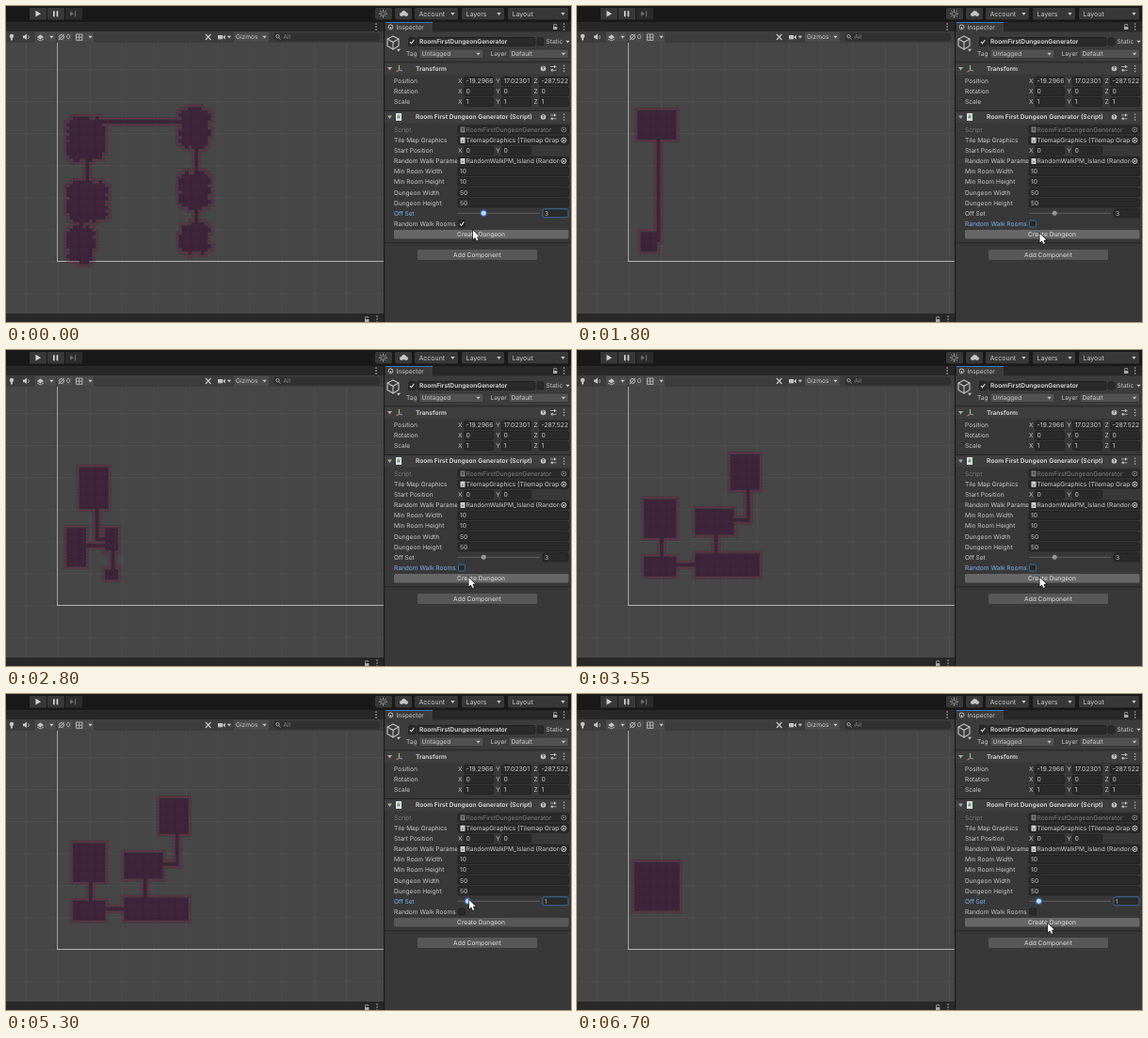
An HTML page with a canvas for the animation above (6.75 s loop, 600x336 px).

```html
<!DOCTYPE html>
<html lang="en">
<head>
<meta charset="utf-8">
<title>Dungeon generator editor</title>
<style>
html, body { margin: 0; width: 100%; height: 100%; overflow: hidden; background: #191919; }
canvas { display: block; }
</style>
</head>
<body>
<canvas id="stage" width="600" height="336"></canvas>
<script>
const LOOP = 6750, SIZE = 50, TILE = 3.4, ORIGIN_X = 54.2, ORIGIN_Y = 271;
const ICON = '#c4c4c4', BUTTON = '#585858', DARK = '#2a2a2a', EDGE = '#202020', FOCUS = '#3a79bb';
const g = document.getElementById('stage').getContext('2d');
g.textBaseline = 'middle';
g.textRendering = 'geometricPrecision';

// Space partition: parts alternate with the tile positions of the cuts; null parts stay empty.
const split = (axis, ...parts) => ({ axis, parts });
const cave = { inset: 3, ragged: true }, room = { inset: 3 }, tight = { inset: 1 };

const maps = [
  { from: 0, start: 0, plan: split('x',
    split('y', split('x', cave, 14), 13, split('x', cave, 18), 27, null, 32, split('x', cave, 17), 47), 19,
    null, 35,
    split('y', null, 3, cave, 14, null, 17, cave, 30, null, 36, cave)) },
  { from: 1300, start: -1, plan: split('y', split('x', null, 1, room, 12), 12, null, 35, split('x', room, 18)) },
  { from: 2250, start: -1, plan: split('y',
    split('x', split('y', null, 9, room), 12, split('y', null, 5, room, 14, room), 22), 27,
    split('x', null, 4, room, 19), 46) },
  { from: 3550, start: -1, plan: split('x', null, 2,
    split('y', null, 6, room, 18, room, 36), 18,
    split('y', null, 6, room, 19, split('x', room, 36), 33, split('x', null, 29, room)), 44) },
  { from: 5750, start: 0, plan: split('x', null, 7,
    split('y', tight, 15, tight, 33, tight, 44), 24,
    split('y', tight, 19, split('x', null, 34, tight), 28, split('x', split('y', tight, 39), 34, tight), 44)) },
  { from: 6350, start: 0, plan: split('x', null, 1, split('y', null, 11, tight, 28), 17) }
];

function random(seed) {
  return () => (seed = seed * 16807 % 2147483647) / 2147483647;
}

function leaves(node, box) {
  if (!node) return [];
  if (!node.parts) return [{ ...node, ...box, cx: Math.round((box.x0 + box.x1) / 2), cy: Math.floor((box.y0 + box.y1) / 2) }];
  const lo = node.axis + '0', hi = node.axis + '1', found = [];
  let low = box[lo];
  for (let i = 0; i < node.parts.length; i += 2) {
    const high = node.parts[i + 1] ?? box[hi];
    found.push(...leaves(node.parts[i], { ...box, [lo]: low, [hi]: high }));
    low = high;
  }
  return found;
}

function carve(r, floor, rand) {
  const x0 = r.x0 + r.inset, y0 = r.ragged ? r.y0 - 1 : r.y0 + r.inset;
  const extra = r.ragged ? 1 : 0, x1 = r.x1 - r.inset + extra, y1 = r.y1 - r.inset + extra;
  for (let y = y0; y < y1; y++) for (let x = x0; x < x1; x++) {
    const dx = Math.min(x - x0, x1 - 1 - x), dy = Math.min(y - y0, y1 - 1 - y);
    const rough = r.ragged && (dx + dy < 2 || Math.min(dx, dy) === 0 && rand() < .4);
    if (!rough) floor.add(x + ',' + y);
  }
}

// Each room leads to the nearest one left: first up or down, then sideways.
function connect(rooms, start, floor) {
  let here = rooms.at(start), left = rooms.filter(r => r !== here);
  const far = r => Math.hypot(r.cx - here.cx, r.cy - here.cy);
  while (left.length) {
    left.sort((a, b) => far(a) - far(b));
    const next = left.shift();
    let { cx: x, cy: y } = here;
    while (y !== next.cy) { floor.add(x + ',' + y); y += Math.sign(next.cy - y); }
    while (x !== next.cx) { floor.add(x + ',' + y); x += Math.sign(next.cx - x); }
    here = next;
  }
}

function build(map) {
  const floor = new Set(), walls = new Set(), rand = random(71);
  const rooms = leaves(map.plan, { x0: 0, y0: 0, x1: SIZE, y1: SIZE });
  rooms.forEach(r => carve(r, floor, rand));
  connect(rooms, map.start, floor);
  for (const key of floor) {
    const [x, y] = key.split(',').map(Number);
    for (let dy = -1; dy < 2; dy++) for (let dx = -1; dx < 2; dx++) {
      const near = (x + dx) + ',' + (y + dy);
      if (!floor.has(near)) walls.add(near);
    }
  }
  Object.assign(map, { floor, walls });
}
maps.forEach(build);

function rect(x, y, w, h, color) {
  g.fillStyle = color;
  g.fillRect(x, y, w, h);
}
function box(x, y, w, h, color, edge, r = 1.5) {
  g.beginPath();
  g.roundRect(x, y, w, h, r);
  g.fillStyle = color;
  g.fill();
  if (edge) { g.strokeStyle = edge; g.lineWidth = .8; g.stroke(); }
}
function trace(points) {
  g.beginPath();
  for (let i = 0; i < points.length; i += 2) g.lineTo(points[i], points[i + 1]);
}
function line(points, color = ICON, width = .8, close) {
  trace(points);
  if (close) g.closePath();
  g.strokeStyle = color;
  g.lineWidth = width;
  g.stroke();
}
function shape(points, color = ICON) {
  trace(points);
  g.fillStyle = color;
  g.fill();
}
function dot(x, y, r, color = ICON, hollow) {
  g.beginPath();
  g.arc(x, y, r, 0, 7);
  g.fillStyle = g.strokeStyle = color;
  g.lineWidth = 1;
  hollow ? g.stroke() : g.fill();
}
function text(s, x, y, { color = '#c8c8c8', size = 6.6, weight = 400, align = 'left', clip } = {}) {
  g.save();
  if (clip) { g.beginPath(); g.rect(x, y - 6, clip, 12); g.clip(); }
  g.font = `${weight} ${size}px Inter, sans-serif`;
  g.textAlign = align;
  g.fillStyle = color;
  g.fillText(s, x, y + .4);
  g.restore();
}
const arrow = (x, y) => shape([x - 2.2, y - 1.2, x + 2.2, y - 1.2, x, y + 1.6]);
const menu = (x, y) => [-3, 0, 3].forEach(d => rect(x - .6, y + d - .6, 1.3, 1.3, '#bbb'));
const check = (x, y) => line([x - 2, y, x - .5, y + 1.8, x + 2.4, y - 2], '#e0e0e0', 1.1);
function lock(x, y) {
  rect(x - 2, y, 4.4, 3, '#aaa');
  line([x - 1.3, y, x - 1.3, y - 2.4, x + 1.6, y - 2.4, x + 1.6, y - 1], '#aaa');
}
function field(x, y, w, value, options = {}) {
  box(x, y - 4.5, w, 9, DARK, options.edge || EDGE);
  text(value, x + 2, y, { clip: w - 2, ...options });
}
function dropdown(label, x, y, w) {
  box(x, y - 4.8, w, 9.5, '#515151', '#303030');
  text(label, x + 2.5, y);
  arrow(x + w - 5.5, y + .2);
}

function drawToolbar() {
  rect(0, 0, 600, 17, '#191919');
  for (let i = 0; i < 3; i++) rect(25 + i * 19, 2, 18, 12.5, i < 2 ? '#383838' : '#2b2b2b');
  shape([31.5, 4.8, 31.5, 11.6, 37, 8.2], '#d2d2d2');
  [50, 53.6].forEach(x => rect(x, 5.3, 1.7, 6, '#d2d2d2'));
  shape([68, 5.5, 68, 11, 72, 8.2], '#6c6c6c');
  rect(73, 5.3, 1.2, 6, '#6c6c6c');
  [392, 413].forEach(x => box(x, 2, 18, 12.5, '#383838'));
  for (let a = 0; a < 6; a += Math.PI / 4) {
    const c = Math.cos(a), s = Math.sin(a);
    line([400.5 + c * 1.5, 8.2 + s * 1.5, 400.5 + c * 4.5, 8.2 + s * 4.5], '#b5b5b5');
  }
  [-2.5, 0, 2.5].forEach(d => dot(422.5 + d, d ? 9 : 7.7, d ? 2 : 2.6));
  [['Account', 434, 46], ['Layers', 484, 45], ['Layout', 533, 64]].forEach(([s, x, w]) => {
    box(x, 2, w, 12.5, '#383838');
    text(s, x + 4.5, 8.4, { size: 7 });
    arrow(x + w - 5.5, 8.3);
  });
}

function drawSceneTools() {
  rect(0, 17, 401, 319, '#282828');
  menu(393, 22);
  rect(0, 27, 401, 12, '#3c3c3c');
  [[31, 22], [54, 17], [72, 21], [242, 37]].forEach(([x, w]) => rect(x, 27.5, w, 11, '#4b4b4b'));
  dot(6, 32, 2.3);
  rect(5, 34, 2, 2.5, ICON);
  shape([18, 31.5, 19.5, 31.5, 22, 29.5, 22, 36, 19.5, 34.2, 18, 34.2]);
  line([23.5, 31, 24.5, 32.8, 23.5, 35]);
  shape([33, 33, 36.5, 30.5, 40, 33, 36.5, 35.5]);
  line([33, 35, 36.5, 37, 40, 35]);
  dot(59, 33, 2.4, ICON, true);
  line([56, 36, 62, 30]);
  text('0', 64, 33);
  [0, 3.2, 6.4].forEach(d => {
    line([74.5 + d, 30, 74.5 + d, 36.4]);
    line([74.5, 30 + d, 81, 30 + d]);
  });
  line([212, 36, 217.5, 30], ICON, 1.2);
  line([212, 30, 217.5, 36], ICON, 1.2);
  rect(225, 31, 5, 4.3, ICON);
  shape([230, 33, 232.8, 30.8, 232.8, 35.5]);
  text('Gizmos', 244, 33);
  [48.5, 89.5, 237, 274.5].forEach(x => arrow(x, 33));
  box(284, 28.5, 113, 9, '#303030', '', 4);
  dot(288.5, 32.2, 1.7, '#aaa', true);
  line([289.7, 33.5, 291.5, 35.5], '#aaa');
  text('All', 294.5, 33, { color: '#858585' });
  lock(383, 333);
  menu(394, 333);
}

function drawScene(map) {
  drawSceneTools();
  rect(0, 39, 401, 288, '#464646');
  for (let x = 21; x < 401; x += 10 * TILE) rect(x, 39, .8, 288, '#4f4f4f');
  for (let y = 67; y < 327; y += 10 * TILE) rect(0, y, 401, .8, '#4f4f4f');
  rect(54, 39, 1, 232, '#a0a0a0');
  rect(54, 271, 347, 1, '#b0b0b0');
  const each = (tiles, paint) => tiles.forEach(key => {
    const [x, y] = key.split(',').map(Number);
    paint(ORIGIN_X + x * TILE, ORIGIN_Y - (y + 1) * TILE);
  });
  each(map.walls, (x, y) => {
    rect(x, y, TILE, TILE, 'rgba(60,35,50,.3)');
    rect(x + .2, y + 1, 3, 1.1, '#6b3145');
  });
  each(map.floor, (x, y) => rect(x - .1, y - .1, TILE + .2, TILE + .2, '#3d2338'));
}

function header(y, title) {
  rect(402, y - 6.5, 198, 13, '#3e3e3e');
  rect(402, y - 7, 198, .8, EDGE);
  shape([405, y - 1.5, 410, y - 1.5, 407.5, y + 2], '#aaa');
  text(title, 435, y, { weight: 600, color: '#dedede' });
  dot(570.5, y, 2.8);
  text('?', 570.5, y, { size: 5, weight: 700, align: 'center', color: '#383838' });
  [-2, 1.8].forEach((d, i) => {
    line([578, y + d, 584.5, y + d], '#bbb');
    rect(i ? 579.3 : 582, y + d - 1.3, 1.3, 2.6, '#ccc');
  });
  menu(592.5, y);
}

function vector(label, y, values) {
  text(label, 412, y);
  values.forEach((v, i) => {
    text('XYZ'[i], 480 + i * 40.3, y);
    field(486.5 + i * 40, y, 31, v, { size: 6.85 });
  });
}

function reference(label, y, value, dim) {
  const color = dim ? '#7d7d7d' : '#cccccc';
  text(label, 412, y, { clip: 68, color });
  field(480, y, 117.5, '');
  box(482.5, y - 3, 5, 6, color, '', .5);
  text(dim ? '#' : '◦', 485, y, { size: 5, align: 'center', color: '#303030' });
  text(value, 488.5, y, { clip: 99, color });
  dot(592.3, y, 2.5, color, true);
  dot(592.3, y, 1, color);
}

function drawObject() {
  rect(402, 27.5, 198, 31, '#3c3c3c');
  line([411, 32, 417, 35, 417, 42.5, 411, 46, 405, 42.5, 405, 35], ICON, 1.1, true);
  line([405, 35, 411, 38.5, 417, 35], ICON, 1.1);
  line([411, 38.5, 411, 46], ICON, 1.1);
  arrow(417, 47);
  field(427.5, 38, 7.5, '');
  check(431, 38);
  field(437, 38, 125, 'RoomFirstDungeonGenerator', { weight: 600, color: '#dedede' });
  box(564, 34, 7, 8, DARK, EDGE);
  text('Static', 573.5, 38);
  arrow(596.5, 38);
  text('Tag', 425, 50.8);
  dropdown('Untagged', 439, 50.8, 68);
  text('Layer', 514.5, 50.8);
  dropdown('Default', 534, 50.8, 63.5);
}

function drawInspector(state) {
  rect(401, 17, 199, 319, '#383838');
  rect(401, 17, 1.2, 319, '#191919');
  rect(402, 17, 198, 10.5, '#282828');
  rect(403, 17, 50, 10.5, '#3c3c3c');
  rect(403, 17, 50, 1, FOCUS);
  dot(408.5, 22.3, 2.4, '#bbb', true);
  rect(408, 22, 1, 2.3, '#ccc');
  text('Inspector', 414.5, 22.5);
  lock(583, 22);
  menu(592.5, 22);
  drawObject();

  header(66.5, 'Transform');
  line([417.5, 63, 417.5, 68], '#9ac865', 1.2);
  line([417.5, 68, 421, 69], '#6f9fd8', 1.2);
  line([417.5, 68, 414.5, 70], '#d87058', 1.2);
  vector('Position', 80, ['-19.2966', '17.02301', '-287.522']);
  vector('Rotation', 91, ['0', '0', '0']);
  vector('Scale', 102, ['1', '1', '1']);

  header(118, 'Room First Dungeon Generator (Script)');
  box(414, 114, 6, 8, '#e2e2e2', '', .6);
  text('#', 417, 118, { size: 6, weight: 700, align: 'center', color: '#469b55' });
  reference('Script', 131.5, 'RoomFirstDungeonGenerator', true);
  reference('Tile Map Graphics', 142.7, 'TilemapGraphics (Tilemap Graphics)');
  vector('Start Position', 153.8, ['0', '0']);
  reference('Random Walk Parameters', 164.9, 'RandomWalkPM_Island (Random Walk)');
  ['Min Room Width', 'Min Room Height', 'Dungeon Width', 'Dungeon Height'].forEach((label, i) => {
    const y = 176 + i * 11.1;
    text(label, 412, y);
    field(480, y, 117.5, i < 2 ? '10' : '50');
  });
  drawControls(state);
}

function drawControls({ offset, sliding, toggling, checked, pressed, hover }) {
  const tint = on => ({ color: on ? '#7fb2ef' : '#c8c8c8' });
  const knob = 482 + offset * 8.4;
  text('Off Set', 412, 220.3, tint(sliding));
  rect(480, 219.8, 87, 1, '#606060');
  if (sliding) dot(knob, 220.2, 3.8, '#3468a5');
  dot(knob, 220.2, 2.5, sliding ? '#c0daf5' : '#999');
  field(570, 220.3, 27, String(offset), { edge: sliding ? FOCUS : EDGE });
  text('Random Walk Rooms', 412, 231.4, tint(toggling));
  box(480.5, 228, 7, 7, DARK, toggling ? FOCUS : EDGE);
  if (checked) check(484, 231.5);
  box(412, 238, 185.5, 9.6, pressed ? '#363636' : hover ? '#676767' : BUTTON);
  text('Create Dungeon', 504.5, 242.8, { align: 'center', color: '#e0e0e0' });
  rect(402, 251.5, 198, .8, '#222');
  box(437, 259, 127, 11, BUTTON);
  text('Add Component', 500.5, 264.5, { align: 'center', color: '#e0e0e0' });
}

// Start time and goal of each pointer move.
const moves = [[150, 484, 231], [750, 491.5, 242], [3900, 495.5, 237.5], [4320, 507, 219], [5000, 490, 219], [5400, 500, 244]];
const MOVE_TIME = 380;

function pointerAt(t) {
  let x = 496, y = 238.5;
  for (const [start, toX, toY] of moves) {
    const k = Math.min(1, Math.max(0, (t - start) / MOVE_TIME)), ease = k * k * (3 - 2 * k);
    x += (toX - x) * ease;
    y += (toY - y) * ease;
  }
  return [x, y];
}

function drawPointer(x, y) {
  const tip = [0, 0, 0, 9.5, 2.2, 7.6, 3.8, 11, 5.4, 10.3, 3.9, 7, 6.8, 6.8].map((v, i) => v + (i % 2 ? y : x));
  line(tip, '#111', 1.2, true);
  shape(tip, '#fff');
}

function draw() {
  const t = performance.now() % LOOP, [x, y] = pointerAt(t);
  const toggled = t >= 600, slid = t >= 4800;
  drawToolbar();
  drawScene(maps.findLast(map => map.from <= t));
  drawInspector({
    offset: t < 5000 ? 3 : Math.max(1, Math.round((Math.min(x, t < 5400 ? x : 490) - 482) / 8.4)),
    sliding: !toggled || slid,
    toggling: toggled && !slid,
    checked: !toggled,
    hover: y > 236,
    pressed: maps.some(map => t >= map.from - 100 && t < map.from)
  });
  drawPointer(x, y);
  requestAnimationFrame(draw);
}
draw();
</script>
</body>
</html>
```
